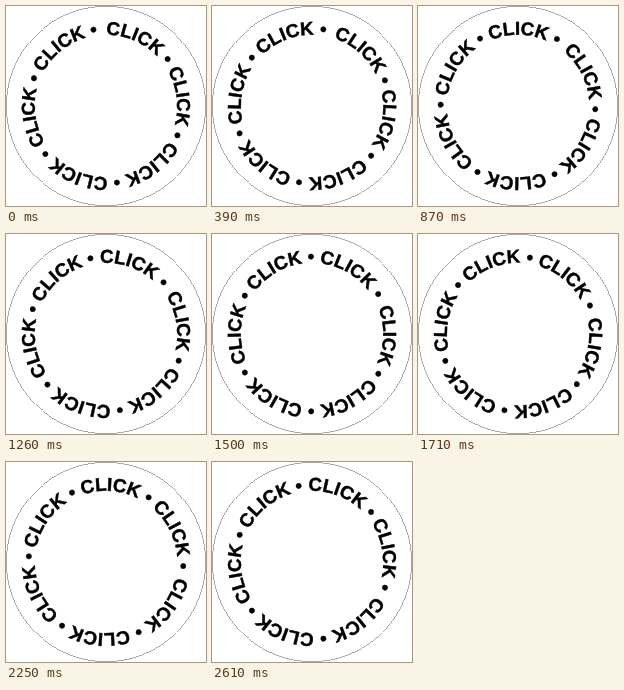
An HTML page for the animation above (2640 ms loop, 200 px wide and 200 px high).

```html
<!DOCTYPE html>
<html lang="en">
<head>
<meta charset="utf-8">
<title>Click badge</title>
<style>
  html, body { margin: 0; width: 100%; height: 100%; overflow: hidden; background: #fff; }
  svg { display: block; width: 100vw; height: 100vh; }
  text {
    font: bold 18.65px "Liberation Sans", Arial, sans-serif;
    text-rendering: geometricPrecision;
    stroke: #000;
    stroke-width: .45px;
  }
</style>
</head>
<body>
<svg viewBox="0 0 200 200">
  <circle cx="100" cy="100" r="99.7" fill="#fff" stroke="#555" stroke-width=".5" shape-rendering="crispEdges"/>
  <path id="ring" d="M100 28.8a71.2 71.2 0 0 1 0 142.4a71.2 71.2 0 0 1 0-142.4" fill="none"/>
  <g id="label">
    <text><textPath href="#ring">CLICK • CLICK • CLICK • CLICK • CLICK • CLICK •</textPath></text>
  </g>
</svg>
<script>
  const LOOP = 2640, TURN = 120;
  const label = document.getElementById('label');
  const start = performance.now();

  function draw() {
    const progress = ((performance.now() - start) % LOOP) / LOOP;
    label.setAttribute('transform', `rotate(${progress * TURN} 100 100)`);
    requestAnimationFrame(draw);
  }
  draw();
</script>
</body>
</html>
```
